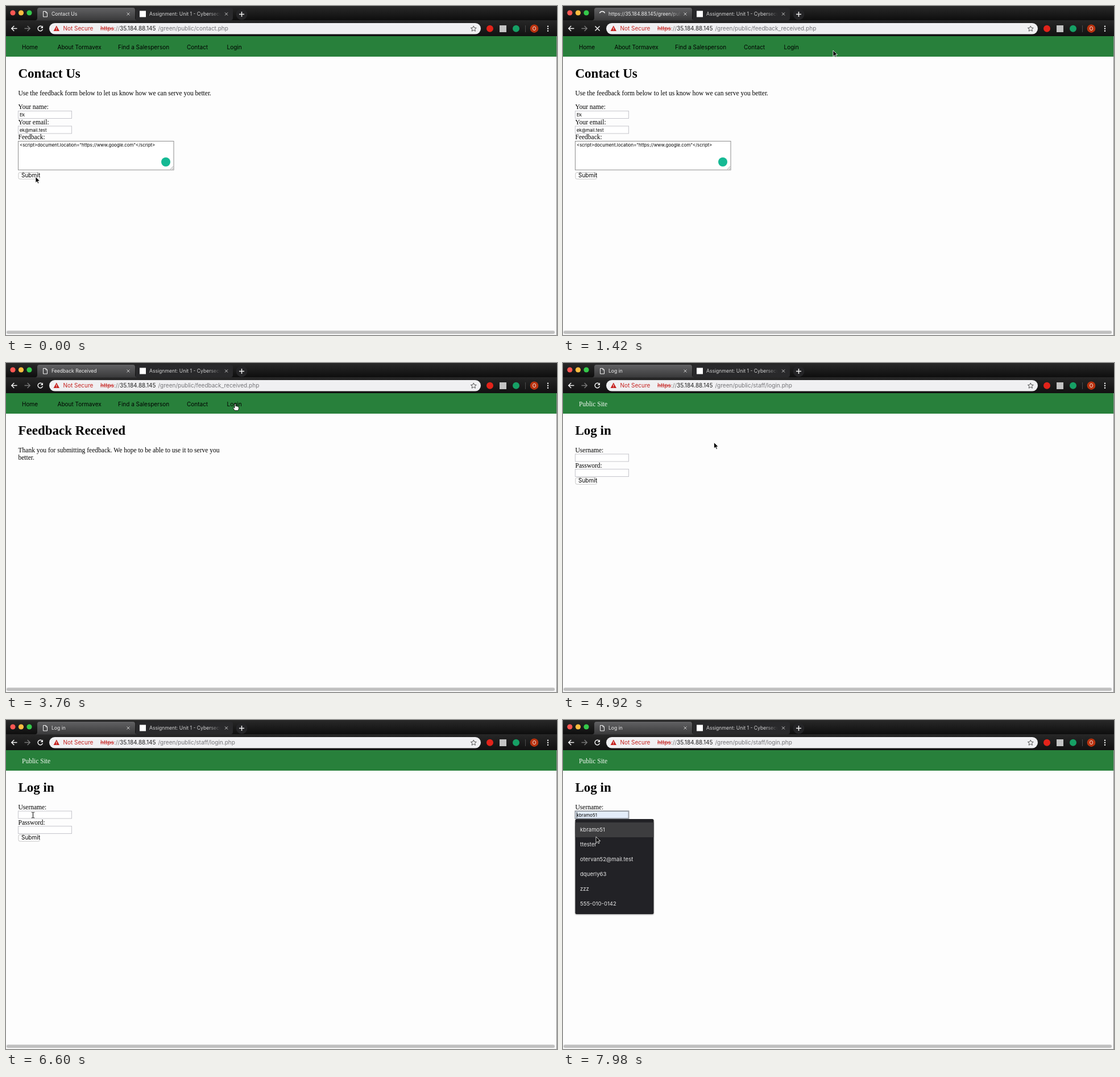
Recreate the animation shown at these times as an HTML page. Size 969 by 578 pixels, loop 8000 ms.

```html
<!DOCTYPE html>
<html lang="en">
<head>
<meta charset="utf-8">
<title>Feedback form</title>
<style>
  html, body { margin: 0; width: 100%; height: 100%; overflow: hidden; background: #fdfdfd; }
  svg { display: block; width: 100%; height: 100%; }
  text { font: 10px Inter, "Open Sans", sans-serif; }
  .tab { font-size: 8.6px; }
  .page text { font: 11.5px "Liberation Serif", "Noto Serif", serif; }
  .page .h1 { font-size: 23px; font-weight: bold; }
  .page .nav { fill: #f4f8f4; }
  .page .small { font: 7.85px Inter, "Open Sans", sans-serif; }
  .menu text { font: 9.6px Inter, "Open Sans", sans-serif; fill: #e6e6e6; }
  .field { fill: #fff; stroke: #c6c6cc; }
  .button { fill: #fff; stroke: #c4c4c4; }
  .icon { fill: none; stroke: #f2f2f2; stroke-width: 1.5; }
  .cursor { fill: #000; stroke: #fff; stroke-width: .8; stroke-linejoin: round; }
</style>
</head>
<body>
<svg viewBox="0 0 969 578" preserveAspectRatio="none">
  <defs>
    <linearGradient id="strip" x2="0" y2="1"><stop stop-color="#292929"/><stop offset="1" stop-color="#0d0d0d"/></linearGradient>
    <linearGradient id="activeTab" x2="0" y2="1"><stop stop-color="#626264"/><stop offset="1" stop-color="#39393a"/></linearGradient>
    <linearGradient id="toolbar" x2="0" y2="1"><stop stop-color="#272727"/><stop offset="1" stop-color="#111"/></linearGradient>
    <linearGradient id="fadeActive" gradientUnits="userSpaceOnUse" x1="186" x2="208">
      <stop stop-color="#eee"/><stop offset="1" stop-color="#eee" stop-opacity="0"/></linearGradient>
    <linearGradient id="fadeIdle" gradientUnits="userSpaceOnUse" x1="356" x2="378">
      <stop stop-color="#d2d2d2"/><stop offset="1" stop-color="#d2d2d2" stop-opacity="0"/></linearGradient>
    <clipPath id="idleClip"><path d="M252 3H378V25H252Z"/></clipPath>
    <clipPath id="activeClip"><path d="M80 3H208V25H80Z"/></clipPath>
    <filter id="shadow" x="-10%" y="-10%" width="120%" height="120%">
      <feDropShadow dx="0" dy="1" stdDeviation="1.2" flood-opacity=".4"/></filter>
    <g id="submit">
      <rect class="button" x="22" y=".5" width="37.5" height="11.5" rx="2.5"/>
      <text class="small" x="27" y="9">Submit</text>
    </g>
    <g id="siteNav">
      <text class="nav" x="28" y="75.5">Home</text>
      <text class="nav" x="90.5" y="75.5">About Tormavex</text>
      <text class="nav" x="197" y="75.5">Find a Salesperson</text>
      <text class="nav" x="318" y="75.5">Contact</text>
      <text class="nav" x="388.5" y="75.5">Login</text>
    </g>
  </defs>

  <rect width="969" height="578" fill="#fdfdfd"/>
  <rect y="53" width="969" height="36" fill="#28803b"/>

  <!-- Window chrome -->
  <rect width="969" height="26" fill="url(#strip)"/>
  <rect y="25" width="969" height="28" fill="url(#toolbar)"/>
  <circle cx="12" cy="12" r="4.6" fill="#fc5753"/>
  <circle cx="26.5" cy="12" r="4.6" fill="#fdbc40"/>
  <circle cx="41" cy="12" r="4.6" fill="#34c84a"/>
  <path d="M51 25.5Q55 25 55 21V7Q55 3 59 3H223Q227 3 227 7V21Q227 25 231 25.5Z" fill="url(#activeTab)"/>
  <path d="M228 25V7Q228 3 232 3H395Q399 3 399 7V21Q399 25 395 25Z" fill="#29292b"/>
  <path id="pageIcon" class="icon" style="stroke-width:1" d="M65.5 9.5H70L72.5 12V19H65.5ZM70 9.5V12H72.5"/>
  <path id="spinner" class="icon" d="M-4.6 -2A5 5 0 0 1 4.6 -2"/>
  <g clip-path="url(#activeClip)"><text id="tabTitle" class="tab" x="80" y="17.3" fill="url(#fadeActive)"></text></g>
  <path class="icon" style="stroke:#c9c9c9;stroke-width:1" d="M212.5 11.5l5 5m0-5l-5 5M385 11.5l5 5m0-5l-5 5"/>
  <rect x="235" y="8.5" width="11" height="11" fill="#fff"/>
  <g clip-path="url(#idleClip)"><text class="tab" x="252" y="17.3" fill="url(#fadeIdle)">Assignment: Unit 1 - Cybersecurity</text></g>
  <circle cx="414.5" cy="14.5" r="10" fill="#242426"/>
  <path class="icon" d="M410 14.5h9M414.5 10v9"/>

  <path class="icon" d="M19.5 39.5H10M14.3 35l-4.5 4.5l4.5 4.5"/>
  <path class="icon" style="stroke:#777" d="M32.5 39.5H42M37.7 35l4.5 4.5l-4.5 4.5"/>
  <g id="reload"><path class="icon" d="M63.3 36.3A4.3 4.3 0 1 0 64.5 40.8"/><path d="M65 34.5V39H60.5Z" fill="#f2f2f2"/></g>
  <path id="stop" class="icon" d="M56.5 35.5l8 8m0-8l-8 8"/>
  <rect x="76" y="30" width="759" height="19.5" rx="9.75" fill="#f0f0f2"/>
  <path d="M88.8 34.5L94 44H83.6Z" fill="#c5221f"/>
  <path d="M88.8 37.8v3M88.8 41.6v1.1" stroke="#fff"/>
  <text x="100.5" y="43.2" fill="#c5221f">Not Secure</text>
  <text x="166" y="43.2" fill="#c5221f" text-decoration="line-through">https</text>
  <text x="190" y="43.2" fill="#777">://</text>
  <text x="200" y="43.2" fill="#222">35.184.88.145</text>
  <text id="path" x="267.5" y="43.2" fill="#747478"></text>
  <path d="M822.3 35l1.4 3.2l3.5.3l-2.6 2.3l.8 3.4l-3.1-1.8l-3.1 1.8l.8-3.4l-2.6-2.3l3.5-.3Z" fill="none" stroke="#555"/>
  <circle cx="851" cy="39.7" r="6" fill="#e2231a"/>
  <rect x="868" y="34" width="12" height="12" fill="#c3c3c3"/>
  <circle cx="897" cy="39.7" r="6" fill="#16a065"/>
  <path d="M913.5 34v12" stroke="#4a4a4a"/>
  <circle cx="929" cy="39.7" r="7.3" fill="#b9330f"/>
  <text class="tab" x="929" y="42.8" text-anchor="middle" fill="#fff">O</text>
  <g fill="#f2f2f2"><circle cx="953" cy="35.8" r="1.2"/><circle cx="953" cy="39.8" r="1.2"/><circle cx="953" cy="43.8" r="1.2"/></g>

  <!-- Contact form -->
  <g class="page">
    <use href="#siteNav"/>
    <text class="h1" x="21.5" y="125.5">Contact Us</text>
    <text x="21.5" y="157">Use the feedback form below to let us know how we can serve you better.</text>
    <text x="21.5" y="181">Your name:</text>
    <rect class="field" x="21.5" y="184.5" width="94" height="13"/>
    <text class="small" x="24" y="194">Ek</text>
    <text x="21.5" y="207.7">Your email:</text>
    <rect class="field" x="21.5" y="211" width="94" height="13"/>
    <text class="small" x="24" y="220.5">ek@mail.test</text>
    <text x="21.5" y="234.3">Feedback:</text>
    <rect class="field" style="stroke:#8d8d8d" x="21.5" y="237.5" width="273.5" height="50.5"/>
    <text class="small" x="24" y="247.3">&lt;script&gt;document.location="https://www.google.com"&lt;/script&gt;</text>
    <path d="M289 287l5-5M292 287l2-2" stroke="#888" stroke-width=".8"/>
    <circle cx="281" cy="274" r="8" fill="#15b994"/>
    <use href="#submit" y="292"/>
  </g>

  <!-- Confirmation -->
  <g class="page">
    <use href="#siteNav"/>
    <text class="h1" x="21.5" y="125.5">Feedback Received</text>
    <text x="21.5" y="157">Thank you for submitting feedback. We hope to be able to use it to serve you</text>
    <text x="21.5" y="170">better.</text>
  </g>

  <!-- Login -->
  <g class="page">
    <text class="nav" x="28" y="75.5">Public Site</text>
    <text class="h1" x="21.5" y="125.5">Log in</text>
    <text x="21.5" y="157">Username:</text>
    <rect id="username" class="field" x="21.5" y="160" width="94" height="13"/>
    <text x="21.5" y="183.5">Password:</text>
    <rect class="field" x="21.5" y="186.5" width="94" height="13"/>
    <use href="#submit" y="201"/>
    <text id="preview" class="small" x="24" y="169.6">kbramo51</text>
    <path id="caret" d="M24.5 162v9.5" stroke="#000" stroke-width=".8"/>
  </g>

  <g id="menu" class="menu">
    <rect x="21.5" y="174" width="138" height="167" rx="2.5" fill="#232325" filter="url(#shadow)"/>
    <rect id="highlight" x="21.5" y="180" width="138" height="26" fill="#3d3d3f"/>
    <text x="30" y="196.3">kbramo51</text>
    <text x="30" y="222.3">ttester</text>
    <text x="30" y="248.2">otervan52@mail.test</text>
    <text x="30" y="274.1">dquerly63</text>
    <text x="30" y="300">zzz</text>
    <text x="30" y="325.9">555-010-0142</text>
  </g>

  <rect y="569.5" width="969" height="8.5" fill="#f6f6f6"/>
  <rect x="1" y="570.5" width="964" height="5.5" rx="2.75" fill="#bfbfbf"/>
  <path d="M968.5 53V578" stroke="#8a8a8a"/>

  <g id="cursor">
    <path id="arrow" class="cursor" d="M0 0V10.6L2.5 8.3L4.1 12L5.9 11.2L4.3 7.6H7.6Z"/>
    <path id="hand" class="cursor" style="fill:#fff;stroke:#000" d="M-1 0Q0 -1.2 1 0V4Q2.2 3 3.2 4.2Q4.4 3.6 5 4.8Q6.4 4.6 6.4 6V8.5L5 11.5H-.8L-3.6 7.2Q-3.8 5.6 -2.4 6L-1 7.2Z"/>
    <path id="ibeam" fill="none" stroke="#000" d="M-2.5 -5Q0 -5 0 -3.5V3.5Q0 5 -2.5 5M2.5 -5Q0 -5 0 -3.5M0 3.5Q0 5 2.5 5"/>
  </g>
</svg>

<script>
const LOOP = 8000, MENU_OPENS = 6900;
const $ = id => document.getElementById(id);
const show = (el, on) => el.style.display = on ? '' : 'none';

// Each page: when its request starts, when it appears, and its I-beam areas [x, y, w, h].
const pages = [
  { request: 0, ready: 0, title: 'Contact Us', path: 'contact.php',
    fields: [[22, 184, 94, 13], [22, 211, 94, 13], [22, 238, 273, 50]] },
  { request: 450, ready: 2000, title: 'Feedback Received', path: 'feedback_received.php', fields: [] },
  { request: 3880, ready: 4480, title: 'Log in', path: 'staff/login.php',
    fields: [[22, 160, 94, 13], [22, 187, 94, 13]] },
];
const loginLink = [385, 64, 35, 18];
const groups = document.querySelectorAll('.page');

// Pointer moves: start, end, destination.
const home = [52, 300];
const moves = [
  [860, 1360, 475, 78], [2020, 2520, 398.5, 67], [2900, 3400, 403, 72],
  [3860, 4160, 265.5, 139.5], [5150, 6050, 47.5, 167], [7580, 7920, 58, 205],
];

const ease = p => p * p * (3 - 2 * p);
const inside = (x, y, [left, top, w, h]) => x >= left && x <= left + w && y >= top && y <= top + h;

function pointerAt(t) {
  let [x, y] = home;
  for (const [start, end, toX, toY] of moves) {
    const p = ease(Math.min(1, Math.max(0, (t - start) / (end - start))));
    x += (toX - x) * p;
    y += (toY - y) * p;
  }
  return [x, y];
}

function draw(t) {
  const shown = pages.findLastIndex(p => t >= p.ready);
  const asked = pages.findLastIndex(p => t >= p.request);
  const loading = asked > shown;
  const menuOpen = t >= MENU_OPENS;
  const [x, y] = pointerAt(t);

  groups.forEach((g, i) => show(g, i === shown));
  $('tabTitle').textContent = loading ? 'https://35.184.88.145/green/public' : pages[shown].title;
  $('path').textContent = '/green/public/' + pages[asked].path;
  show($('pageIcon'), !loading);
  show($('spinner'), loading);
  show($('reload'), !loading);
  show($('stop'), loading);
  $('spinner').setAttribute('transform', `translate(69 14.5) rotate(${(1420 - t) * .3})`);

  const hovering = menuOpen && y >= 180;
  show($('menu'), menuOpen);
  show($('highlight'), hovering);
  show($('preview'), hovering);
  show($('caret'), menuOpen && (t - MENU_OPENS) % 1000 < 500 || hovering);
  $('username').style.cssText = menuOpen
    ? `stroke:#9a9fa6;stroke-width:2;fill:${hovering ? '#e3edfa' : '#fff'}` : '';

  const onField = pages[shown].fields.some(f => inside(x, y, f)) && !(menuOpen && y > 173);
  const onLink = shown < 2 && inside(x, y, loginLink);
  const shape = onField ? 'ibeam' : onLink ? 'hand' : 'arrow';
  for (const id of ['arrow', 'hand', 'ibeam']) show($(id), id === shape);
  $('cursor').setAttribute('transform', `translate(${x} ${y})`);
}

function tick() {
  draw(performance.now() % LOOP);
  requestAnimationFrame(tick);
}
tick();
</script>
</body>
</html>
```
